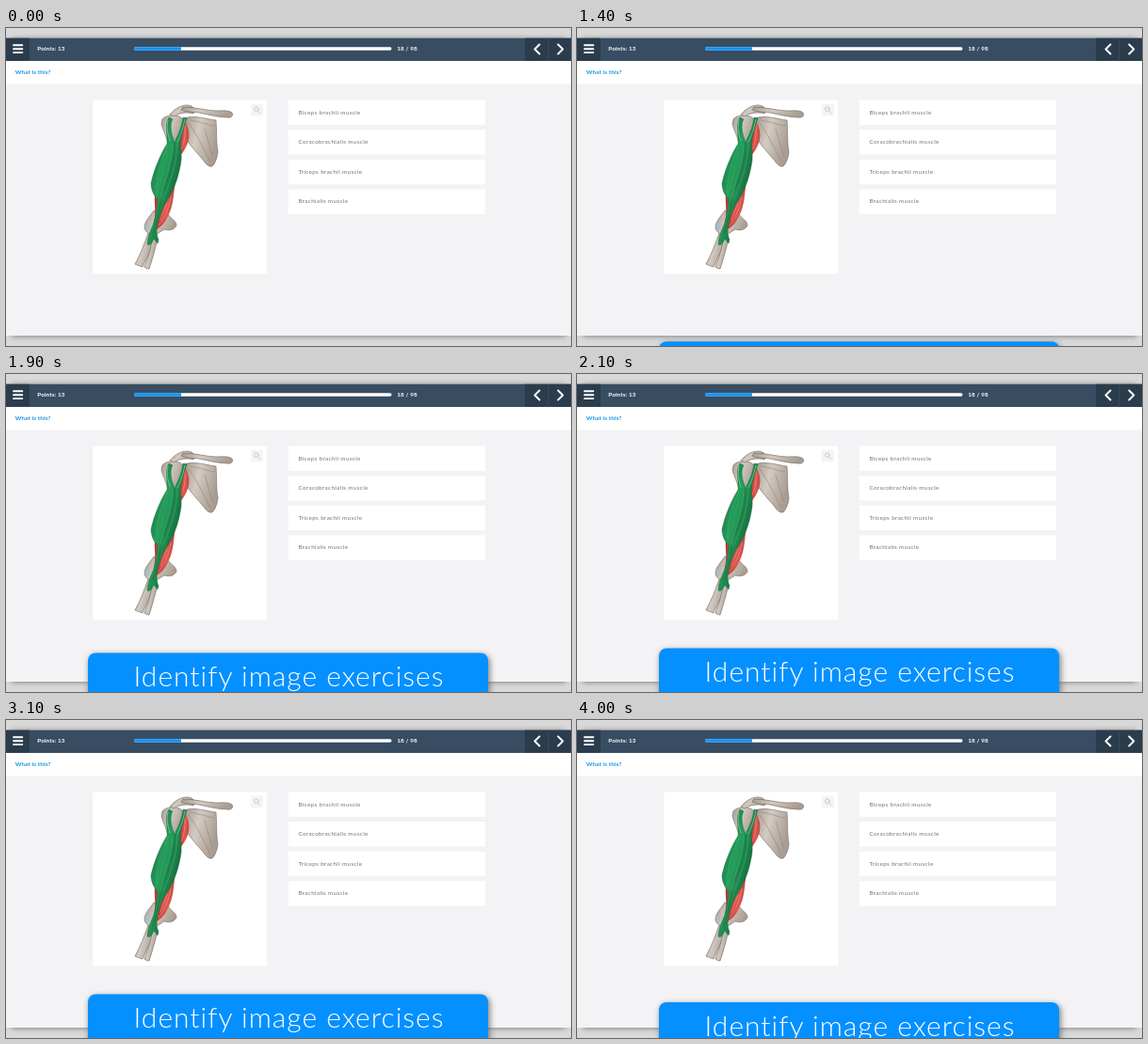
These frames come from a looping animation (600 by 338 pixels, 4100 ms). An HTML page:

```html
<!DOCTYPE html>
<html lang="en">
<head>
<meta charset="utf-8">
<title>Anatomy quiz</title>
<style>
  html, body { margin: 0; width: 100%; height: 100%; overflow: hidden; background: #d9d9d9; }
  svg { display: block; width: 600px; height: 338px; }
  text { font-family: Lato, "Open Sans", sans-serif; }
  .bold { font-size: 6.3px; font-weight: 700; letter-spacing: .12px; }
  .answer { font-size: 6.3px; letter-spacing: .35px; fill: #737377; }
  .title { font-size: 30px; font-weight: 300; letter-spacing: 1px; fill: #fff; text-anchor: middle; }
  .line { fill: none; stroke-linecap: round; stroke-linejoin: round; }
  .bone { fill: url(#bone); stroke: #6f645c; stroke-width: .6; stroke-linejoin: round; }
  .red { fill: url(#red); }
  .green { fill: url(#green); stroke: #12613a; stroke-width: .4; }
</style>
</head>
<body>
<svg viewBox="0 0 600 338">
  <defs>
    <linearGradient id="bone" x2="1" y2=".4">
      <stop stop-color="#a3978d"/><stop offset=".45" stop-color="#d3cac1"/><stop offset="1" stop-color="#a99d93"/>
    </linearGradient>
    <linearGradient id="red" x2="1">
      <stop stop-color="#b5342f"/><stop offset=".6" stop-color="#e0584f"/><stop offset="1" stop-color="#bd4a43"/>
    </linearGradient>
    <linearGradient id="green" gradientUnits="userSpaceOnUse" x1="155" y1="146" x2="186" y2="154">
      <stop stop-color="#1d7f49"/><stop offset=".4" stop-color="#26a05c"/><stop offset="1" stop-color="#15693c"/>
    </linearGradient>
    <filter id="blur" x="-10%" y="-80%" width="120%" height="260%"><feGaussianBlur stdDeviation="3"/></filter>
  </defs>

  <!-- window -->
  <rect width="600" height="338" fill="#d9d9d9"/>
  <rect x="6" y="12" width="588" height="315" fill="#666" filter="url(#blur)"/>
  <rect y="10.7" width="600" height="316.3" fill="#f3f2f5"/>
  <rect y="34" width="600" height="25.5" fill="#fff"/>
  <rect y="10.7" width="600" height="24.3" fill="#384d62"/>
  <path fill="#2b3c4d" d="M0 10.7h25v24.3h-25zM551 10.7h49v24.3h-49z"/>
  <path class="line" stroke="#40556a" stroke-width=".7" d="M576 11v24"/>
  <path class="line" stroke="#fff" stroke-width="1.9" d="M8 18.3h9.3M8 22.2h9.3M8 26.1h9.3M566.5 17.5l-5 5 5 5M586.3 17.5l5 5-5 5"/>
  <text class="bold" x="33.3" y="24.2" fill="#fff">Points: 13</text>
  <rect x="136" y="20.3" width="273.5" height="3.4" rx="1.7" fill="#fff"/>
  <path fill="#1593f5" d="M186 20.3h-48.3a1.7 1.7 0 0 0 0 3.4h48.3z"/>
  <text class="bold" x="415.3" y="24.2" fill="#fff">18 / 98</text>
  <text class="bold" x="9.8" y="49.2" fill="#1593e6">What is this?</text>

  <!-- illustration -->
  <rect x="92.3" y="76.5" width="185" height="184.7" fill="#fff"/>
  <rect x="260" y="80.5" width="13" height="13" rx="1" fill="#f4f4f4"/>
  <g class="line" stroke="#c9c9c9" stroke-width="1">
    <circle cx="265.8" cy="86.2" r="2.3"/><path d="M267.6 88l2.3 2.3"/>
  </g>
  <g>
    <path class="bone" d="M189 96C200 92 213 97 223 98C224 110 223 121 225 132C224 139 222 144 219 147C215 148 212 144 209 140C203 133 196 125 191 118Z"/>
    <path class="line" stroke="#8e8279" stroke-width=".8" opacity=".7" d="M194 101C201 111 209 125 216 141M196 98C207 100 214 103 221 104M211 107L219 135"/>
    <path class="bone" d="M166 97C170 92 182 91 187 96C191 102 188 110 182 117L172 124C171 116 166 107 165 102Z"/>
    <path class="bone" d="M174 92C178 87 185 82 192 82C199 82 202 87 199 91C193 89 184 90 178 94Z"/>
    <path class="bone" d="M188 84C201 84 213 88 224 88C230 88 236 87 240 90C242 93 239 96 235 95C225 95 215 92 205 90C198 89 190 89 186 87Z"/>
    <path class="bone" d="M151 218L159 222C155 233 150 243 145 254C142 253 139 252 137 251C143 240 147 229 151 218Z"/>
    <path class="bone" d="M156 222L161 224C158 236 155 247 152 256C150 256 148 255 147 254C151 244 154 233 156 222Z"/>
    <path class="bone" d="M157 194C152 201 147 206 147 212C148 218 153 219 157 221L168 214C174 216 179 214 181 210C181 204 174 203 171 196Z"/>
    <ellipse cx="150" cy="211" rx="2.3" ry="3.4" fill="#a9bcc8"/>
    <path class="red" d="M189 97C194 104 196 114 193 122C191 128 188 132 184 137L183 119Z"/>
    <path class="red" d="M180 160C178 176 178 189 172 200C169 207 165 211 160 214L157 206C160 196 157 186 158 177Z"/>
    <path class="line" stroke="#f4a39c" stroke-width=".5" d="M190 103C191 113 189 122 186 129M175 180C173 192 168 202 162 210M171 186L164 204"/>
    <path class="green" d="M173 95C168 103 172 114 171 123C164 134 157 151 154 165C154 172 157 178 161 182C160 192 159 204 154 214C152 219 150 224 150 230C153 232 155 228 157 224L161 229L162 225C159 218 160 211 162 204C164 195 168 188 172 182C180 169 184 155 186 141C187 131 184 124 186 117C188 109 190 102 192 96L188 95C187 103 184 112 179 121C176 114 173 104 177 97Z"/>
    <path class="line" stroke="#52b97d" stroke-width=".6" opacity=".7" d="M172 124C166 140 159 155 160 175M177 123C176 143 168 163 164 180M182 122C182 144 174 164 167 182"/>
    <path class="line" stroke="#0f5932" stroke-width=".7" opacity=".6" d="M179 121C180 138 174 155 168 171M164 184C163 195 159 208 156 219"/>
    <path class="line" stroke="#68c18c" stroke-width="1" d="M172 98C170 107 172 113 174 120M190 97C188 107 185 115 182 121"/>
  </g>

  <g id="answers"></g>

  <g id="banner">
    <rect x="88" y="2" width="426" height="60" rx="8" fill="#666" opacity=".8" filter="url(#blur)"/>
    <rect x="87" width="425" height="60" rx="8" fill="#0590ff"/>
    <text class="title" x="300.5" y="35.5">Identify image exercises</text>
  </g>
</svg>
<script>
  const LOOP = 4100, HIDDEN = 344, REST = 291.5;
  const banner = document.getElementById('banner');

  document.getElementById('answers').innerHTML =
    ['Biceps brachii', 'Coracobrachialis', 'Triceps brachii', 'Brachialis'].map((name, i) => {
      const y = 76.5 + i * 31.6;
      return `<rect x="299.7" y="${y}" width="209.3" height="26.4" fill="#fff"/>
        <text class="answer" x="310.4" y="${y + 15.1}">${name} muscle</text>`;
    }).join('');

  function bannerTop(t) {
    if (t < 1200) return 400;
    const p = Math.min((t - 1100) / 1000, 1);
    const rise = (1 - Math.cos(Math.PI * p)) / 2;
    const fall = Math.max(0, (t - 3611) / 389);
    return HIDDEN + (REST - HIDDEN) * rise + 8.5 * fall * fall;
  }

  function draw() {
    // The picture advances in steps of 100 ms.
    const t = Math.floor(performance.now() % LOOP / 100) * 100;
    banner.setAttribute('transform', `translate(0 ${bannerTop(t)})`);
    requestAnimationFrame(draw);
  }
  draw();
</script>
</body>
</html>
```
